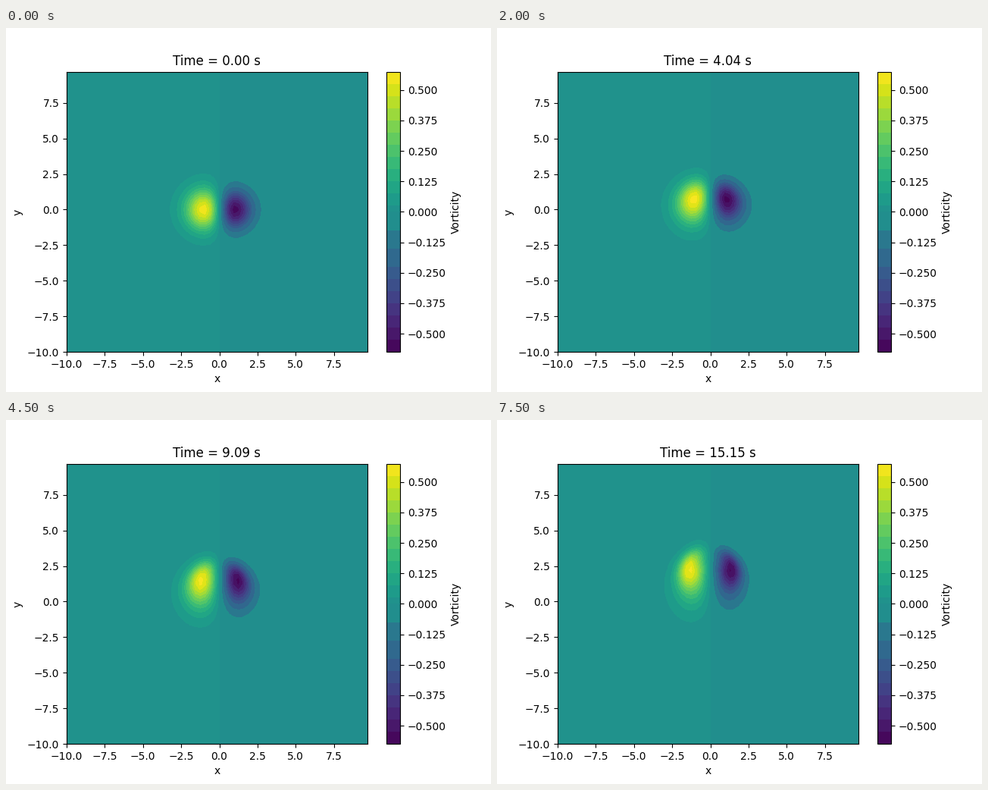
Write a matplotlib script that moves like this. It is 640 px wide and 480 px high and loops after 8000 ms.

```python
import numpy as np
import matplotlib.pyplot as plt
from matplotlib.animation import FuncAnimation
from matplotlib.cm import ScalarMappable
from matplotlib.colors import BoundaryNorm, ListedColormap

# Vortex pair on a periodic square: vorticity / stream function form
N, L, NU = 64, 20.0, 0.001
FRAMES, INTERVAL = 16, 500
DT_FRAME, SUBSTEPS = 100 / 99, 25

h = L / N
x = -L / 2 + h * np.arange(N)
X, Y = np.meshgrid(x, x)
k = 2 * np.pi * np.fft.fftfreq(N, h)
KX, KY = np.meshgrid(k, k)
K2 = KX**2 + KY**2
K2[0, 0] = 1.0


def diff(f, axis):
    return (np.roll(f, -1, axis) - np.roll(f, 1, axis)) / (2 * h)


def laplacian(f):
    return sum(np.roll(f, s, a) for s in (1, -1) for a in (0, 1)) / h**2 - 4 * f / h**2


def rhs(w):
    w_hat = np.fft.fft2(w)
    w_hat[0, 0] = 0
    psi = np.real(np.fft.ifft2(-w_hat / K2))
    return (diff(psi, 0) * diff(w, 1) - diff(psi, 1) * diff(w, 0)
            + NU * laplacian(w))


def rk4(w, dt):
    a = rhs(w)
    b = rhs(w + dt / 2 * a)
    c = rhs(w + dt / 2 * b)
    d = rhs(w + dt * c)
    return w + dt / 6 * (a + 2 * b + 2 * c + d)


def gauss(cx):
    return np.exp(-((X - cx)**2 + Y**2) / 2)


def one_signed(w):
    """Keep each half plane to a single sign so the zero line stays at x = 0."""
    tiny = 1e-9
    left = np.where(X < 0, np.maximum(w, tiny), 0)
    return np.where(X > 0, np.minimum(w, -tiny), left)


def simulate():
    w = gauss(-0.5) - gauss(0.5)
    fields = []
    for _ in range(FRAMES):
        fields.append(one_signed(w))
        for _ in range(SUBSTEPS):
            w = rk4(w, DT_FRAME / SUBSTEPS)
    return fields


fields = simulate()

# Colour bands: pairs of 0.025 steps, wider just below zero
levels = np.concatenate([
    -0.575 + 0.05 * np.arange(8),
    [-0.15, -0.075, 0.0],
    0.025 + 0.05 * np.arange(12),
])
mids = (levels[:-1] + levels[1:]) / 2
mids[levels[1:] == 0] = -0.0125


def band_colors(limit):
    edge = limit - 0.0125
    return plt.cm.viridis((np.clip(mids, -edge, edge) / limit + 1) / 2)


fig, ax = plt.subplots(figsize=(6.4, 4.8), dpi=100)
scale = ScalarMappable(BoundaryNorm(levels, len(mids)),
                       ListedColormap(band_colors(0.575)))
bar = fig.colorbar(scale, ax=ax, label="Vorticity", spacing="proportional",
                   ticks=np.arange(-4, 5) * 0.125)
bar.minorticks_off()


def update(i):
    w = fields[i]
    limit = 0.025 * np.ceil(np.abs(w).max() / 0.025)
    ax.clear()
    ax.contourf(X, Y, w, levels=levels, colors=band_colors(limit))
    ax.set_title(f"Time = {i * DT_FRAME:.2f} s")
    ax.set_xlabel("x")
    ax.set_ylabel("y")
    return []


anim = FuncAnimation(fig, update, frames=FRAMES, interval=INTERVAL,
                     init_func=lambda: update(0), repeat=True, repeat_delay=0)
plt.show()
```
